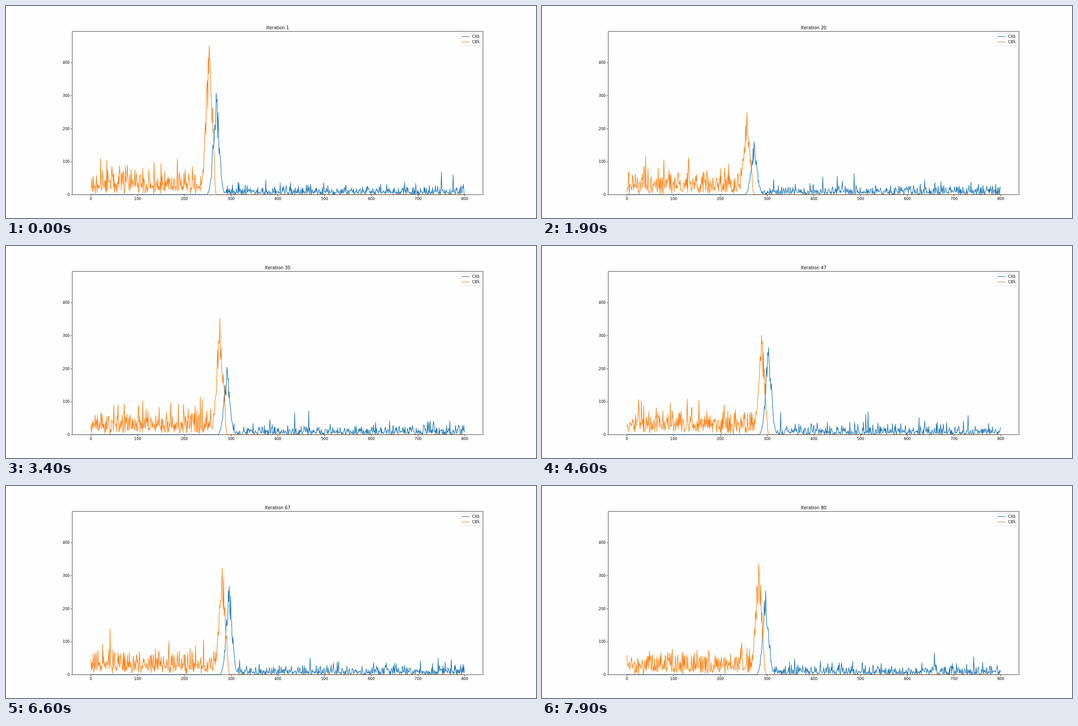
An HTML page for the animation above (8000 ms loop, 1183x473 px).

```html
<!DOCTYPE html>
<html lang="en">
<head>
<meta charset="utf-8">
<title>Iterations</title>
<style>
  html, body { margin: 0; width: 100%; height: 100%; overflow: hidden; background: #fefefe; }
  svg { display: block; width: 1183px; height: 473px; }
  text { font: 8.17px "DejaVu Sans", sans-serif; fill: #000; }
  #title { font-size: 9.8px; }
  .mid { text-anchor: middle; }
  .end { text-anchor: end; }
  .line { fill: none; stroke-width: 1.23; stroke-linejoin: round; stroke-linecap: square; }
  .cas { stroke: #1f77b4; }
  .cbs { stroke: #ff7f0e; }
  .axis { fill: none; stroke: #000; stroke-width: .8; }
</style>
</head>
<body>
<svg viewBox="0 0 1183 473">
  <defs><clipPath id="area"><rect x="147.9" y="56.8" width="916.8" height="364.2"/></clipPath></defs>
  <g clip-path="url(#area)">
    <polyline id="cas" class="line cas"/>
    <polyline id="cbs" class="line cbs"/>
  </g>
  <rect class="axis" x="147.9" y="56.8" width="916.8" height="364.2"/>
  <g id="ticks"></g>
  <text id="title" class="mid" x="606.3" y="51.9"></text>
  <rect x="1014.4" y="61" width="46.2" height="27.2" rx="1.6" fill="#fefefe" stroke="#ccc" stroke-width=".8" opacity=".9"/>
  <path class="line cas" d="M1018 68.1H1034"/>
  <path class="line cbs" d="M1018 80.1H1034"/>
  <text x="1040.6" y="71.1">CAS</text>
  <text x="1040.6" y="83.1">CBS</text>
</svg>
<script>
const BINS = 800, STEPS = 80, STEP_MS = 100;
const $ = id => document.getElementById(id);
const px = bin => 189.55 + bin * 1.0432;
const py = count => 420.97 - count * 0.7369;
const mix = (a, b, u) => a + (b - a) * u;

// Where the two groups meet, and how high each one piles up there.
const keys = [
  { at: 1, front: 268, cbs: 449, cas: 308 },
  { at: 20, front: 272, cbs: 247, cas: 160 },
  { at: 35, front: 291, cbs: 352, cas: 204 },
  { at: 47, front: 303, cbs: 300, cas: 264 },
  { at: 55, front: 297, cbs: 258, cas: 298 },
  { at: 67, front: 296, cbs: 322, cas: 268 },
  { at: 80, front: 297, cbs: 336, cas: 254 }
];

function seeded(seed) {
  let s = Math.imul(seed, 0x9E3779B1);
  return () => {
    s = s + 0x6D2B79F5 | 0;
    let t = Math.imul(s ^ s >>> 15, 1 | s);
    t = t + Math.imul(t ^ t >>> 7, 61 | t) ^ t;
    return ((t ^ t >>> 14) >>> 0) / 4294967296;
  };
}

const even = v => 2 * Math.max(0, Math.round(v / 2));

// Sum of exponential draws: mostly low counts with rare tall spikes.
function noise(rand, draws, scale) {
  let sum = 0;
  for (let i = 0; i < draws; i++) sum -= Math.log(rand() + 1e-6);
  return even(sum * scale - 2);
}

// Jagged bell that reaches its full height at its centre.
function bump(rand, d, width, height) {
  const jag = d ? mix(0.62, 1, rand()) : 1;
  return even(height * jag * Math.exp(-((d / width) ** 2)));
}

function stateAt(n, rand) {
  let k = 0;
  while (k < keys.length - 2 && n >= keys[k + 1].at) k++;
  const a = keys[k], b = keys[k + 1];
  const u = (n - a.at) / (b.at - a.at);
  const sway = 0.4 * Math.sin(Math.PI * u);
  const height = key => mix(a[key], b[key], u) * (1 + sway * (rand() - 0.5));
  return { front: Math.round(mix(a.front, b.front, u)), cbs: height("cbs"), cas: height("cas") };
}

function plot(id, count) {
  const points = [];
  for (let bin = 0; bin < BINS; bin++) points.push(px(bin).toFixed(2) + "," + py(count(bin)).toFixed(2));
  $(id).setAttribute("points", points.join(" "));
}

function draw(n) {
  const rand = seeded(n);
  const { front, cbs, cas } = stateAt(n, rand);
  plot("cbs", bin => {
    if (bin >= front) return 0;
    const fade = Math.min(1, (front - bin) / 5);
    return fade * Math.max(noise(rand, 3, 12), bump(rand, bin - front + 15, 10, cbs));
  });
  plot("cas", bin => {
    const d = bin - front;
    if (d < -18) return 0;
    return Math.max(d > 10 ? noise(rand, 2, 6.3) : 0, bump(rand, d, 9, cas));
  });
  $("title").textContent = "Iteration " + n;
}

function ticks() {
  let out = "";
  for (let v = 0; v <= 800; v += 100) {
    out += `<path class="axis" d="M${px(v)} 421v3.2"/><text class="mid" x="${px(v)}" y="433.4">${v}</text>`;
  }
  for (let v = 0; v <= 400; v += 100) {
    out += `<path class="axis" d="M147.9 ${py(v)}h-3.2"/><text class="end" x="142.2" y="${py(v) + 3.2}">${v}</text>`;
  }
  $("ticks").innerHTML = out;
}

let shown = 0;
const begin = performance.now();
function tick(now) {
  const n = Math.floor(Math.max(0, now - begin) / STEP_MS) % STEPS + 1;
  if (n !== shown) draw(shown = n);
  requestAnimationFrame(tick);
}

ticks();
draw(shown = 1);
requestAnimationFrame(tick);
</script>
</body>
</html>
```
